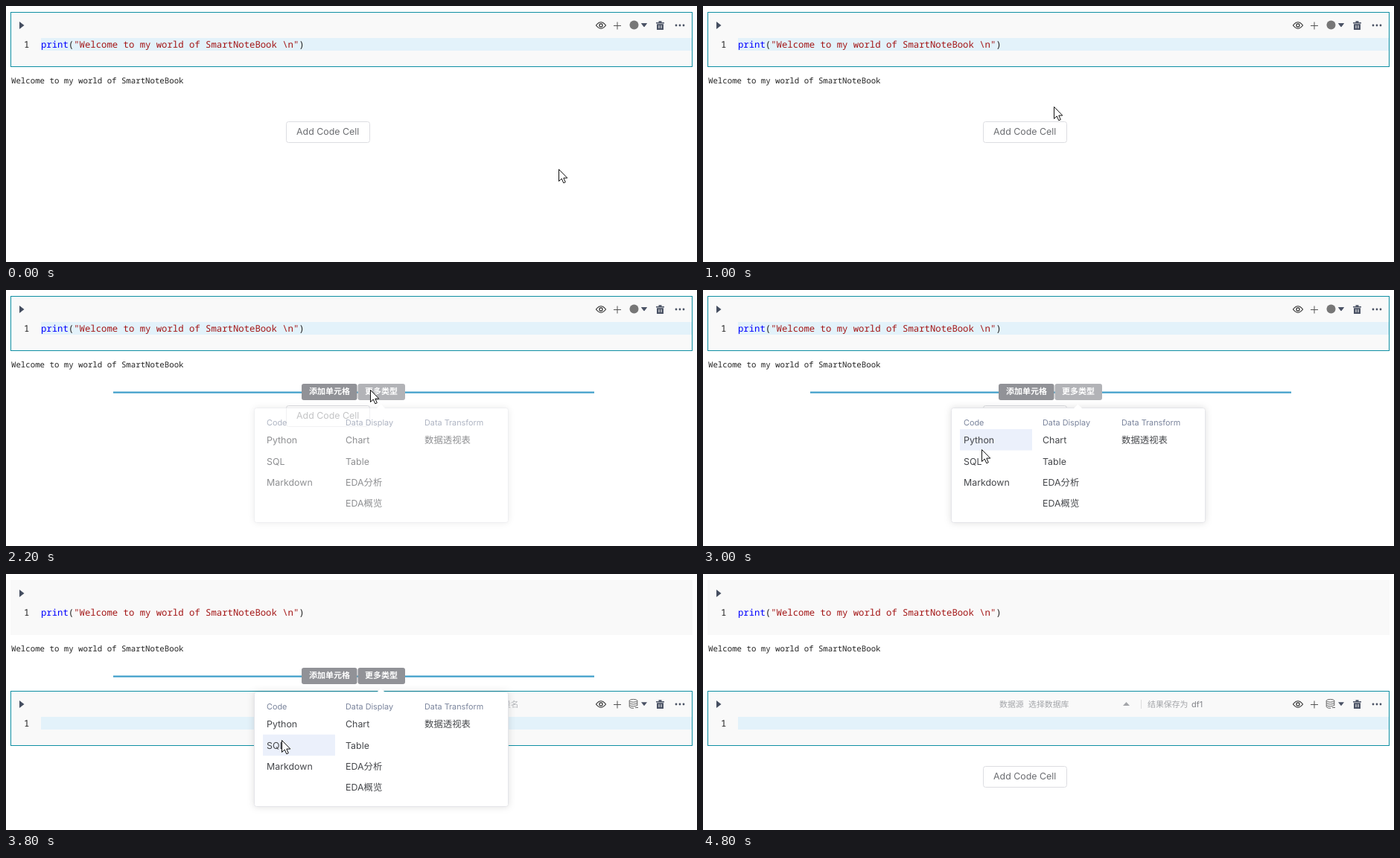
Recreate the animation shown at these times as an HTML page. Size 928 by 344 pixels, loop 5400 ms.

```html
<!DOCTYPE html>
<html lang="zh">
<head>
<meta charset="utf-8">
<title>Notebook: add a cell</title>
<style>
html, body { margin: 0; width: 100%; height: 100%; overflow: hidden; background: #fff; }
svg { display: block; width: 928px; height: 344px; }
text { font-family: Inter, "Noto Sans CJK SC", "Noto Sans CJK", sans-serif; text-rendering: geometricPrecision; }
.code { font: 12.29px "Noto Sans Mono", monospace; fill: #222; }
.out { font: 10.72px "Noto Sans Mono", monospace; fill: #222; }
.item { font-size: 12.4px; fill: #45474b; }
.head { font-size: 10.85px; fill: #7a849c; }
.bar { font-size: 10.9px; fill: #a3a5a9; }
.pill { font-size: 11px; font-weight: 700; fill: #fff; }
.box { filter: drop-shadow(0 0 5px rgba(0, 0, 0, .13)); }
</style>
</head>
<body>
<svg viewBox="0 0 928 344">
  <defs>
    <g id="tools" fill="none" stroke="#333">
      <path d="M792.5 26Q799 17.5 805.5 26Q799 34.5 792.5 26Z" stroke-width="1.2"/>
      <circle cx="799" cy="26" r="2.1" stroke-width="1.2"/>
      <path d="M816 26.5H826M821 21.5V31.5" stroke="#555"/>
      <g fill="#4a5264" stroke="none">
        <path d="M853 23.3H861L857 28.2Z"/>
        <path d="M873 22H876.5V20.3H880.5V22H884V23.5H873ZM874 24.3H883V32H874Z"/>
        <path d="M877 26V30M880 26V30" stroke="#f9f9f9"/>
        <circle cx="900" cy="26" r="1.4"/><circle cx="905" cy="26" r="1.4"/><circle cx="910" cy="26" r="1.4"/>
      </g>
    </g>
    <path id="play" d="M18 21V31L24.5 26Z" fill="#454e60"/>
    <g id="active">
      <rect x="6.5" y="8.5" width="915" height="73" fill="none" stroke="#0e8fa3"/>
      <rect x="47" y="43" width="874" height="17" fill="#e3f2fa"/>
      <use href="#tools"/>
    </g>
  </defs>

  <rect x="6" y="8" width="916" height="74" fill="#f9f9f9"/>
  <g id="first">
    <use href="#active"/>
    <circle cx="843.5" cy="25.5" r="6" fill="#777"/>
    <path d="M853 23.3H861L857 28.2Z" fill="#4a5264"/>
  </g>
  <use href="#play"/>
  <text class="code" x="24" y="56">1</text>
  <text class="code" x="47" y="56"><tspan fill="#00f">print</tspan>(<tspan fill="#a31515">"Welcome to my world of SmartNoteBook \n"</tspan>)</text>
  <text class="out" x="7" y="104">Welcome to my world of SmartNoteBook</text>

  <g id="second" transform="translate(0 149)">
    <rect x="6" y="8" width="916" height="74" fill="#f9f9f9"/>
    <use href="#active"/>
    <use href="#play"/>
    <g fill="none" stroke="#666">
      <ellipse cx="842.5" cy="21.3" rx="5.3" ry="1.9"/>
      <path d="M837.2 21.3V29.5Q838 31.4 843 31.4M847.8 21.3V28M837.2 24Q838 26 842.5 26T847.8 24M837.2 27Q838 28.8 842.5 28.8T847.8 27M845 30.5H849"/>
    </g>
    <text class="code" x="24" y="56">1</text>
    <g class="bar">
      <text x="398" y="29.5">数据源</text>
      <text x="437" y="29.5">选择数据库</text>
      <path d="M564 28H573L568.5 23Z" fill="#a3a5a9"/>
      <path d="M588.5 20V32" stroke="#ddd"/>
      <text x="597" y="29.5">结果保存为</text>
      <text id="result" x="656" y="29.5"></text>
    </g>
  </g>

  <g id="add">
    <rect x="376.5" y="155.5" width="112" height="28" rx="3" fill="#fff" stroke="#dcdde1"/>
    <text class="item" x="390" y="173" style="fill:#6b6d71">Add Code Cell</text>
  </g>

  <path id="line" d="M-323 0H323" stroke="#409fca" stroke-width="2.2"/>
  <g id="pills">
    <rect id="left" x="397" y="126" width="74.5" height="22" rx="3"/>
    <rect id="right" x="472.5" y="126" width="63.5" height="22" rx="3"/>
    <text class="pill" x="407" y="139.5">添加单元格</text>
    <text class="pill" x="482" y="139.5">更多类型</text>
  </g>

  <g id="menu">
    <rect class="box" x="333.5" y="158.5" width="341" height="154" rx="3" fill="#fff" stroke="#e4e5e9"/>
    <path d="M497.5 159.5L503.5 153.5L509.5 159.5Z" fill="#fff"/>
    <rect id="pick" x="345" width="97" height="28.5" fill="#ebf0fb"/>
  </g>

  <path id="cursor" d="M.5 .5V16.5L4.2 13L6.8 18.8L9.3 17.7L6.8 12.1H11.8Z" fill="#fff" stroke="#111"/>
</svg>
<script>
const $ = id => document.getElementById(id);
const show = (id, opacity) => $(id).setAttribute("opacity", +opacity);
const place = (id, value) => $(id).setAttribute("transform", value);

const columns = [
  ["Code", "Python", "SQL", "Markdown"],
  ["Data Display", "Chart", "Table", "EDA分析", "EDA概览"],
  ["Data Transform", "数据透视表"]
];
columns.forEach((labels, c) => labels.forEach((label, r) => {
  const t = document.createElementNS("http://www.w3.org/2000/svg", "text");
  t.setAttribute("class", r ? "item" : "head");
  t.setAttribute("x", 350 + 106 * c);
  t.setAttribute("y", r ? 178 + 28.3 * r : 182);
  t.textContent = label;
  $("menu").append(t);
}));

const LOOP = 5400, STEP = 200;
const DARK = "#919297", MID = "#a1a2a7", LIGHT = "#b2b3b7";
// pointer tip at every step
const path = [
  [742, 219], [639, 187], [545, 124], [479, 118], [475, 124], [471, 135], [470, 138],
  [469, 141], [476, 141], [483, 138], [488, 136], [489, 134], [489, 134], [443, 169],
  [405, 197], [374, 214], [373, 222], [370, 223], [373, 239], [370, 223], [370, 223]
];

function draw(now) {
  const n = Math.floor(now % LOOP / STEP);
  const added = n >= 19;
  show("first", !added);
  show("second", added);
  $("result").textContent = n < 23 ? "变量名" : "df1";
  $("result").style.fill = n < 23 ? "#b4b6ba" : "#808287";
  place("add", `translate(0 ${added ? 103 : 0})`);

  show("line", n === 2 ? .5 : n === 6 ? .6 : n > 6 && n < 21);
  place("line", `translate(467 137.7) scale(${n === 2 ? .9 : 1} 1)`);
  show("pills", n >= 7 && n < 22);
  $("left").setAttribute("fill", n < 9 ? LIGHT : DARK);
  $("right").setAttribute("fill", n < 9 || n > 17 ? DARK : n === 9 ? MID : LIGHT);

  show("menu", n === 11 ? .6 : n === 20 ? .5 : n > 11 && n < 20);
  show("pick", n >= 14);
  $("pick").setAttribute("y", n < 16 ? 187 : 215.7);

  show("cursor", n < path.length);
  place("cursor", `translate(${path[Math.min(n, path.length - 1)]})`);
}

const start = performance.now();
function tick() {
  draw(performance.now() - start);
  requestAnimationFrame(tick);
}
tick();
</script>
</body>
</html>
```
